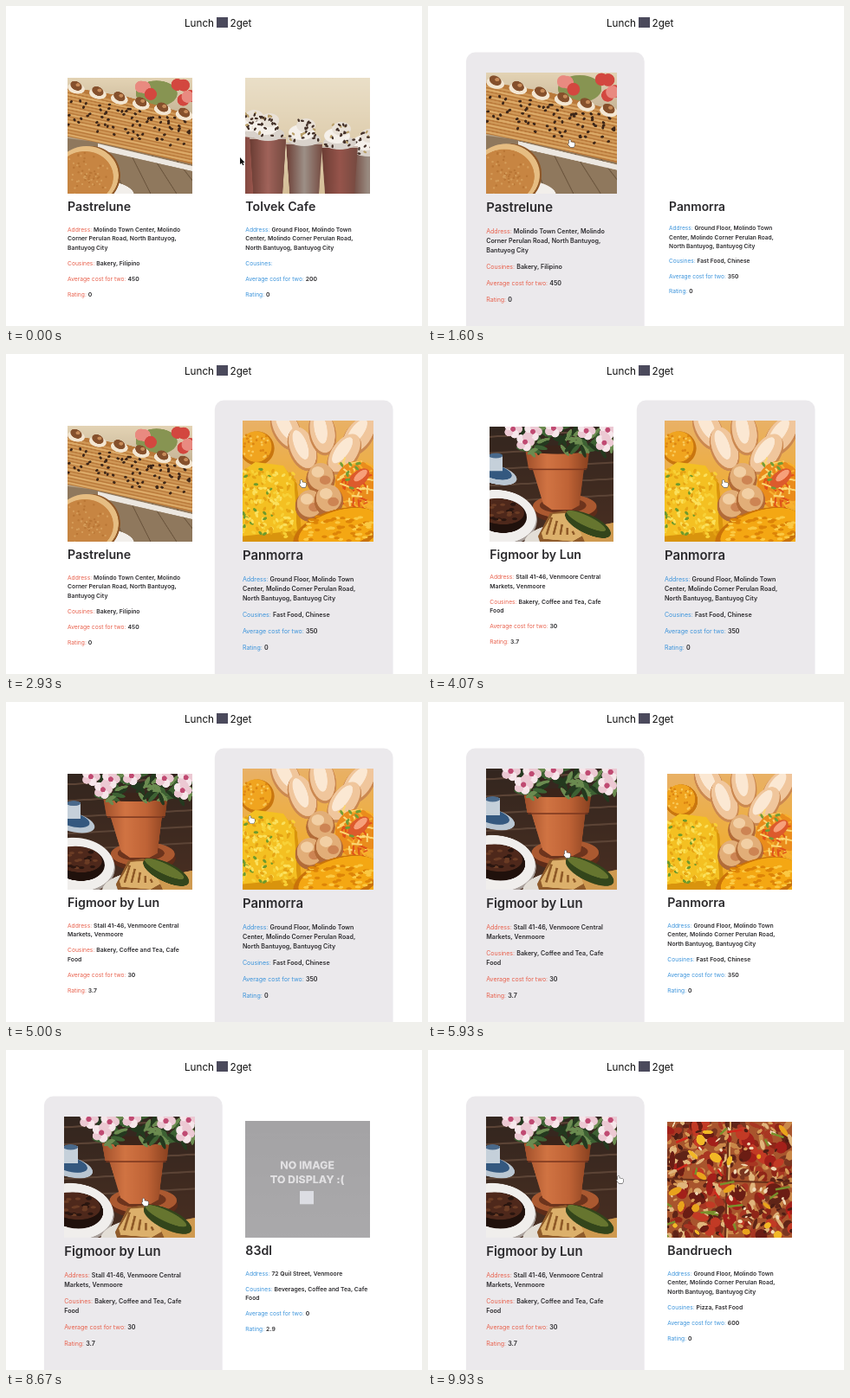
Animation of 480 by 370 pixels, one loop 9990 ms. Source, as an HTML page with a canvas:

```html
<!DOCTYPE html>
<html lang="en">
<head>
<meta charset="utf-8">
<title>Lunch 2get</title>
<style>
html, body { margin: 0; width: 100%; height: 100%; overflow: hidden; background: #fff; }
canvas { display: block; }
</style>
</head>
<body>
<canvas id="stage" width="480" height="370"></canvas>
<script>
const LOOP = 9990;
const PHOTO_W = 143.6, PHOTO_H = 133.4, PHOTO_TOP = 83.3;
const FONT = 'Inter, sans-serif';
const ctx = document.getElementById('stage').getContext('2d');

const clamp = v => Math.min(1, Math.max(0, v));
const easeOut = p => 1 - (1 - clamp(p)) ** 2.4;
const smooth = p => { p = clamp(p); return p * p * (3 - 2 * p); };

function seeded(seed) {
  return () => (seed = (seed * 16807) % 2147483647) / 2147483647;
}

// Painting helpers: g is the context of the photo being painted.
function rect(g, color, x, y, w, h) {
  g.fillStyle = color;
  g.fillRect(x, y, w, h);
}
function oval(g, color, x, y, rx, ry = rx, turn = 0) {
  g.fillStyle = color;
  g.beginPath();
  g.ellipse(x, y, rx, ry, turn, 0, 7);
  g.fill();
}
function poly(g, color, ...p) {
  g.fillStyle = color;
  g.beginPath();
  for (let i = 0; i < p.length; i += 2) g.lineTo(p[i], p[i + 1]);
  g.closePath();
  g.fill();
}
function line(g, color, width, x1, y1, x2, y2) {
  g.strokeStyle = color;
  g.lineWidth = width;
  g.beginPath();
  g.moveTo(x1, y1);
  g.lineTo(x2, y2);
  g.stroke();
}
function across(g, x1, x2, ...colors) {
  const shade = g.createLinearGradient(x1, 0, x2, 0);
  colors.forEach((color, i) => shade.addColorStop(i / (colors.length - 1), color));
  return shade;
}
function fade(g, top, bottom) {
  const shade = g.createLinearGradient(0, 0, 0, PHOTO_H);
  shade.addColorStop(0, top);
  shade.addColorStop(1, bottom);
  rect(g, shade, 0, 0, 144, 134);
}

function cakeRoll(g) {
  const rnd = seeded(41);
  fade(g, '#e3d3b4', '#8b7358');
  oval(g, '#879452', 103, 18, 24, 15);
  for (let i = 0; i < 8; i++) oval(g, i % 3 ? '#d3473f' : '#e98a80', 85 + rnd() * 58, rnd() * 26, 7);
  poly(g, '#8f785d', 0, 70, 144, 88, 144, 134, 0, 134);
  for (let i = 0; i < 5; i++) line(g, '#6d573f', 1, 50 + i * 24, 90, 66 + i * 30, 134);
  poly(g, '#ece7e0', 35, 76, 144, 102, 144, 108, 35, 83);
  poly(g, '#b9793a', 0, 10, 70, 22, 144, 43, 144, 100, 45, 77, 0, 68);
  for (let i = 0; i < 14; i++) {
    line(g, i % 2 ? '#dba967' : '#cf9857', 2.4, 0, 15 + i * 3.9, 144, 46 + i * 3.9);
  }
  for (let i = 0; i < 75; i++) {
    const x = rnd() * 144;
    oval(g, '#3d2618', x, 20 + x * .2 + rnd() * 36, 1.8, 1.4, rnd() * 3);
  }
  for (let i = 0; i < 6; i++) {
    const x = 10 + i * 25, y = 10 + i * 6.2;
    oval(g, '#f3e6d2', x, y + 2, 10, 6, .2);
    oval(g, '#85502c', x, y - 1, 7, 5, .5);
    oval(g, '#c78b59', x + 2, y - 2, 2.5, 2);
  }
  oval(g, '#f2efeb', 30, 136, 47, 18);
  oval(g, '#8e5727', 27, 113, 34, 34);
  oval(g, '#e6bd82', 22, 113, 37, 34);
  oval(g, '#c78542', 20, 115, 33, 30);
  for (let i = 0; i < 70; i++) {
    const a = rnd() * 7, r = rnd() * 28;
    oval(g, i % 2 ? '#d49b58' : '#b97635', 20 + r * Math.cos(a), 114 + r * Math.sin(a), 1.2);
  }
}

function milkshakes(g) {
  const rnd = seeded(7);
  fade(g, '#eadfc8', '#d5bf98');
  const cups = [[8, 66, '#96544b'], [142, 88, '#9a8c82'], [109, 80, '#96544b'], [68, 76, '#9d9087'], [26, 70, '#a0635a']];
  for (const [x, top, tone] of cups) {
    poly(g, across(g, x - 21, x + 21, '#6b3d34', tone, '#754a40'), x - 21, top, x + 21, top, x + 17, 134, x - 17, 134);
    line(g, '#c5b5aa', 2, x - 21, top, x + 21, top);
    oval(g, '#d9d2cb', x, top - 5, 19, 8);
    oval(g, '#f5f0ea', x - 3, top - 13, 15, 9);
    oval(g, '#e9e1d7', x + 2, top - 21, 11, 8);
    for (let i = 0; i < 24; i++) {
      const dy = rnd() * 27;
      oval(g, i % 4 ? '#443129' : '#baa06b', x + (rnd() - .5) * (42 - dy), top - dy, 2, 1.2, rnd() * 3);
    }
  }
}

function friedRice(g) {
  const rnd = seeded(19);
  fade(g, '#e9b166', '#f3ab18');
  for (const [x, y, turn] of [[48, 8, 1.1], [128, 16, 2.2], [66, 30, 1.2], [88, 12, 1.4], [112, 36, 2.2]]) {
    oval(g, '#cb8850', x, y + 2, 25, 15, turn);
    oval(g, '#f0c69c', x, y, 24, 13.5, turn);
    oval(g, '#fbe8d3', x - 2, y - 3, 17, 7, turn);
  }
  oval(g, '#c9760f', 16, 31, 19);
  oval(g, '#f0a41f', 15, 29, 17);
  for (let i = 0; i < 30; i++) oval(g, i % 2 ? '#f9c857' : '#dc8512', 2 + rnd() * 26, 16 + rnd() * 26, 1.3);
  oval(g, '#ea8c1c', 126, 72, 24, 27);
  for (let i = 0; i < 60; i++) {
    const x = 104 + rnd() * 34, y = 46 + rnd() * 50;
    line(g, ['#e0521a', '#f7b02e', '#fbd672'][i % 3], 2, x, y, x + 15 * rnd(), y - 10 + 20 * rnd());
  }
  oval(g, '#dd5a2c', 128, 64, 14, 8, -.7);
  oval(g, '#f7a07a', 130, 61, 9, 4, -.7);
  for (let i = 0; i < 9; i++) oval(g, '#729c36', 108 + rnd() * 34, 46 + rnd() * 40, 3, 1.4, rnd() * 3);
  poly(g, '#d9940d', 0, 58, 12, 48, 46, 52, 60, 70, 66, 134, 0, 134);
  poly(g, '#f4c022', 0, 56, 14, 46, 45, 50, 57, 68, 60, 122, 0, 128);
  for (let i = 0; i < 170; i++) {
    const x = rnd() * 57;
    oval(g, i % 10 ? ['#fbe05c', '#e5a314', '#f8d137'][i % 3] : '#6f9a2c', x, 52 + x * .1 + rnd() * 72, 2.6, 1.5, rnd() * 3);
  }
  for (const [x, y] of [[86, 62], [74, 92], [95, 86]]) {
    oval(g, '#b26b38', x, y + 3, 16, 17);
    oval(g, '#e2ae78', x, y, 14, 15);
    oval(g, '#f2cfa4', x - 3, y - 5, 7, 6);
    oval(g, '#cd8453', x + 5, y + 4, 6, 5);
  }
  oval(g, '#c9720a', 104, 124, 50, 25, -.3);
  oval(g, '#f4a713', 106, 121, 46, 21, -.3);
  for (let i = 0; i < 70; i++) oval(g, i % 2 ? '#fbc943' : '#dd8408', 68 + rnd() * 74, 106 + rnd() * 27, 3, 1.5);
}

function flowerPot(g) {
  const rnd = seeded(63);
  fade(g, '#33261f', '#4a2f22');
  for (let i = 0; i < 5; i++) line(g, '#5c4436', 2, 0, 12 + i * 19, 144, 4 + i * 19);
  oval(g, '#b9c6d2', 6, 56, 26, 11, .25);
  oval(g, '#34587f', 6, 53, 20, 8, .25);
  rect(g, '#c5d0da', 0, 33, 15, 19);
  oval(g, '#49698b', 7, 34, 8, 3);
  oval(g, '#5e2c19', 88, 98, 37, 15);
  oval(g, '#ab5930', 87, 93, 37, 14);
  oval(g, '#6d341d', 85, 92, 27, 9);
  const clay = across(g, 42, 116, '#a1502b', '#d17443', '#bf6336', '#87401f');
  poly(g, clay, 48, 44, 110, 44, 104, 92, 95, 97, 72, 97, 62, 90);
  poly(g, clay, 41, 26, 116, 26, 113, 49, 45, 49);
  line(g, '#7b371f', 1.5, 46, 50, 112, 50);
  oval(g, '#3b241a', 79, 27, 36, 5);
  for (let i = 0; i < 75; i++) {
    oval(g, ['#24391f', '#3d6133', '#6b8b50'][i % 3], 38 + rnd() * 104, rnd() * 30, 8, 2.4, rnd() * 3);
  }
  for (const [x, y] of [[27, 3], [50, 6], [41, 18], [74, 2], [112, 5], [137, 4], [133, 19]]) {
    for (let a = 0; a < 5; a++) oval(g, a % 2 ? '#f6e6ea' : '#ecc9d3', x + 6 * Math.cos(a * 1.26), y + 6 * Math.sin(a * 1.26), 5);
    oval(g, '#c04a72', x, y, 3);
  }
  oval(g, '#a89f9a', 10, 107, 45, 32, .1);
  oval(g, '#f0eeec', 10, 105, 44, 31, .1);
  oval(g, '#20110c', 13, 104, 30, 20, .1);
  oval(g, '#4e281b', 12, 99, 28, 15, .1);
  for (let i = 0; i < 24; i++) oval(g, i % 2 ? '#6b3c25' : '#2a1610', rnd() * 33, 89 + rnd() * 20, 3, 1.5);
  oval(g, '#e3ded6', 102, 136, 62, 25);
  poly(g, '#8f5b2b', 56, 128, 70, 101, 88, 98, 118, 128, 112, 134, 58, 134);
  poly(g, '#dcb06b', 60, 124, 73, 102, 87, 101, 110, 126, 96, 134, 62, 131);
  for (let i = 0; i < 5; i++) line(g, '#8f5a28', 2.5, 72 + i * 6, 106 + i * 4, 66 + i * 8, 126);
  poly(g, '#cf9a50', 104, 120, 144, 112, 144, 134, 110, 134);
  oval(g, '#33451b', 114, 114, 29, 11, .45);
  oval(g, '#66752f', 112, 110, 25, 6, .45);
}

function pizza(g) {
  const rnd = seeded(88);
  const scatter = (count, tones, rx, ry) => {
    for (let i = 0; i < count; i++) {
      oval(g, tones[i % tones.length], rnd() * 144, rnd() * 134, rx * (.5 + rnd()), ry * (.5 + rnd()), rnd() * 3);
    }
  };
  rect(g, '#a8552d', 0, 0, 144, 134);
  scatter(260, ['#c98748', '#8f2618', '#5f2417', '#e0b57c', '#a83622', '#7a3620'], 5.5, 3.5);
  line(g, '#6b3019', 2.5, 71, 0, 67, 134);
  line(g, '#d9a868', 2, 73, 0, 69, 134);
  line(g, '#6b3019', 2, 0, 66, 144, 71);
  scatter(60, ['#a3201a', '#6b1d14', '#c23a25'], 7, 5);
  scatter(110, ['#f0d9b4', '#d79c58', '#4d1d14'], 2.8, 1.5);
  scatter(18, ['#f2b826', '#e9a31c'], 5.5, 3.5);
  for (let i = 0; i < 22; i++) {
    const x = rnd() * 144, y = rnd() * 134, a = rnd() * 6;
    line(g, i % 3 ? '#79902c' : '#d0281c', 2.5, x, y, x + 18 * Math.cos(a), y + 8 * Math.sin(a));
  }
}

function noImage(g) {
  fade(g, '#a4a3a5', '#aaa9ab');
  g.fillStyle = '#e1e0e2';
  g.font = '800 12.4px ' + FONT;
  g.textAlign = 'center';
  g.fillText('NO IMAGE', 71.5, 55.5);
  g.fillText('TO DISPLAY :(', 71.5, 72);
  rect(g, '#dcdde3', 63, 81, 16, 15);
}

function photo(paint) {
  const sheet = document.createElement('canvas');
  sheet.width = 288;
  sheet.height = 268;
  const g = sheet.getContext('2d');
  g.scale(2, 2);
  paint(g);
  return sheet;
}

const mallAddress = ['Ground Floor, Molindo Town', 'Center, Molindo Corner Perulan Road,', 'North Bantuyog, Bantuyog City'];

function place(name, address, cuisines, cost, rating, paint, loadDelay = 0, extra = {}) {
  const fields = [['Address:', address], ['Cousines:', cuisines], ['Average cost for two:', [cost]], ['Rating:', [rating]]];
  return { name, fields, picture: photo(paint), loadDelay, midY: 214, top: PHOTO_TOP, ...extra };
}

const bakery = place('Pastrelune',
  ['Molindo Town Center, Molindo', 'Corner Perulan Road, North Bantuyog,', 'Bantuyog City'],
  ['Bakery, Filipino'], '450', '0', cakeRoll);
const shakes = place('Tolvek Cafe', mallAddress, [''], '200', '0', milkshakes);
const noodles = place('Panmorra', mallAddress, ['Fast Food, Chinese'], '350', '0', friedRice, 310);
const garden = place('Figmoor by Lun',
  ['Stall 41-46, Venmoore Central', 'Markets, Venmoore'],
  ['Bakery, Coffee and Tea, Cafe', 'Food'], '30', '3.7', flowerPot, 200);
const bar = place('83dl', ['72 Quil Street, Venmoore'],
  ['Beverages, Coffee and Tea, Cafe', 'Food'], '0', '2.9', noImage, 0, { midY: 205, top: 81.6 });
const pizzeria = place('Bandruech', mallAddress, ['Pizza, Fast Food'], '600', '0', pizza, 200);

// shows: [time the place appears, place]; hovers: [enter, leave]
const sides = [
  { x: 71, midX: 146.8, tint: '#e8604c', shows: [[-2000, bakery], [3700, garden]], hovers: [[740, 2680], [5080, 20000]] },
  { x: 276.3, midX: 343.7, tint: '#3a93db', shows: [[-2000, shakes], [1390, noodles], [7050, bar], [8900, pizzeria]], hovers: [[2680, 5080]] }
];

// [time, x, y]: the pointer rests between equal points
const pointerPath = [
  [0, 270, 180], [680, 270, 180], [1000, 166, 159], [2500, 166, 159], [2860, 343, 150],
  [4450, 343, 150], [5000, 284, 136], [5420, 161, 176], [9760, 161, 176], [9930, 222, 150]
];

function write(text, x, y, font, color) {
  ctx.font = font + ' ' + FONT;
  ctx.fillStyle = color;
  ctx.fillText(text, x, y);
  return ctx.measureText(text).width;
}

function drawCard(side, t) {
  const [since, shown] = side.shows.findLast(([start]) => t >= start);
  const hover = Math.max(0, ...side.hovers.map(([enter, leave]) =>
    smooth((t - enter) / 200) * (1 - smooth((t - leave) / 200))));
  const scale = .9 + .1 * easeOut((t - since) / 500) + .05 * hover;

  ctx.save();
  ctx.translate(side.midX, shown.midY);
  ctx.scale(scale, scale);
  ctx.translate(-side.midX, -shown.midY);
  if (hover > 0) {
    ctx.globalAlpha = hover;
    ctx.fillStyle = '#ebe9ec';
    ctx.beginPath();
    ctx.roundRect(side.midX - 98, 61.2, 196, 320, 10);
    ctx.fill();
    ctx.globalAlpha = 1;
  }
  if (t >= since + shown.loadDelay) {
    ctx.drawImage(shown.picture, side.x, shown.top, PHOTO_W, PHOTO_TOP + PHOTO_H - shown.top);
  }
  write(shown.name, side.x, 237.3, '600 14.2px', '#2b2a2d');
  let y = 260.6;
  for (const [label, lines] of shown.fields) {
    const indent = write(label, side.x, y, '400 6.7px', side.tint) + 2;
    lines.forEach((text, i) => write(text, side.x + (i ? 0 : indent), y + i * 10.6, '600 6.8px', '#2b2a2d'));
    y += lines.length * 10.6 + 7.3;
  }
  ctx.restore();
}

function drawPointer(t) {
  const next = pointerPath.findIndex(([time]) => time > t);
  const [t0, x0, y0] = pointerPath.at(next < 0 ? -1 : next - 1);
  const [t1, x1, y1] = pointerPath.at(next);
  const p = t1 > t0 ? (t - t0) / (t1 - t0) : 1;
  ctx.save();
  ctx.translate(x0 + (x1 - x0) * p, y0 + (y1 - y0) * p);
  ctx.lineWidth = 1;
  ctx.lineJoin = 'round';
  const arrow = t < 745;
  const shape = new Path2D(arrow
    ? 'M0-5V3L2 1.5L3.2 4.2L4.5 3.6L3.3 1H5.5Z'
    : 'M-3.3-4Q-2.3-5-1.3-4V-1.5Q-.2-2.2.6-1.3Q1.6-1.8 2.2-1Q3.3-1.2 3.3.2V1.8L2.3 4.3H-1.7L-4.3 1Q-4.3-.3-3.3.3Z');
  ctx.strokeStyle = arrow ? '#fff' : '#333';
  ctx.fillStyle = arrow ? '#111' : '#fff';
  ctx.stroke(shape);
  ctx.fill(shape);
  ctx.restore();
}

function draw(now) {
  const t = now % LOOP;
  rect(ctx, '#fff', 0, 0, 480, 370);
  write('Lunch', 206, 24, '400 11.7px', '#111');
  rect(ctx, '#4b4a5c', 243, 13, 13, 12);
  write('2get', 258.5, 24, '400 11.7px', '#111');
  sides.forEach(side => drawCard(side, t));
  drawPointer(t);
}

const started = performance.now();
function tick() {
  draw(performance.now() - started);
  requestAnimationFrame(tick);
}
tick();
</script>
</body>
</html>
```
